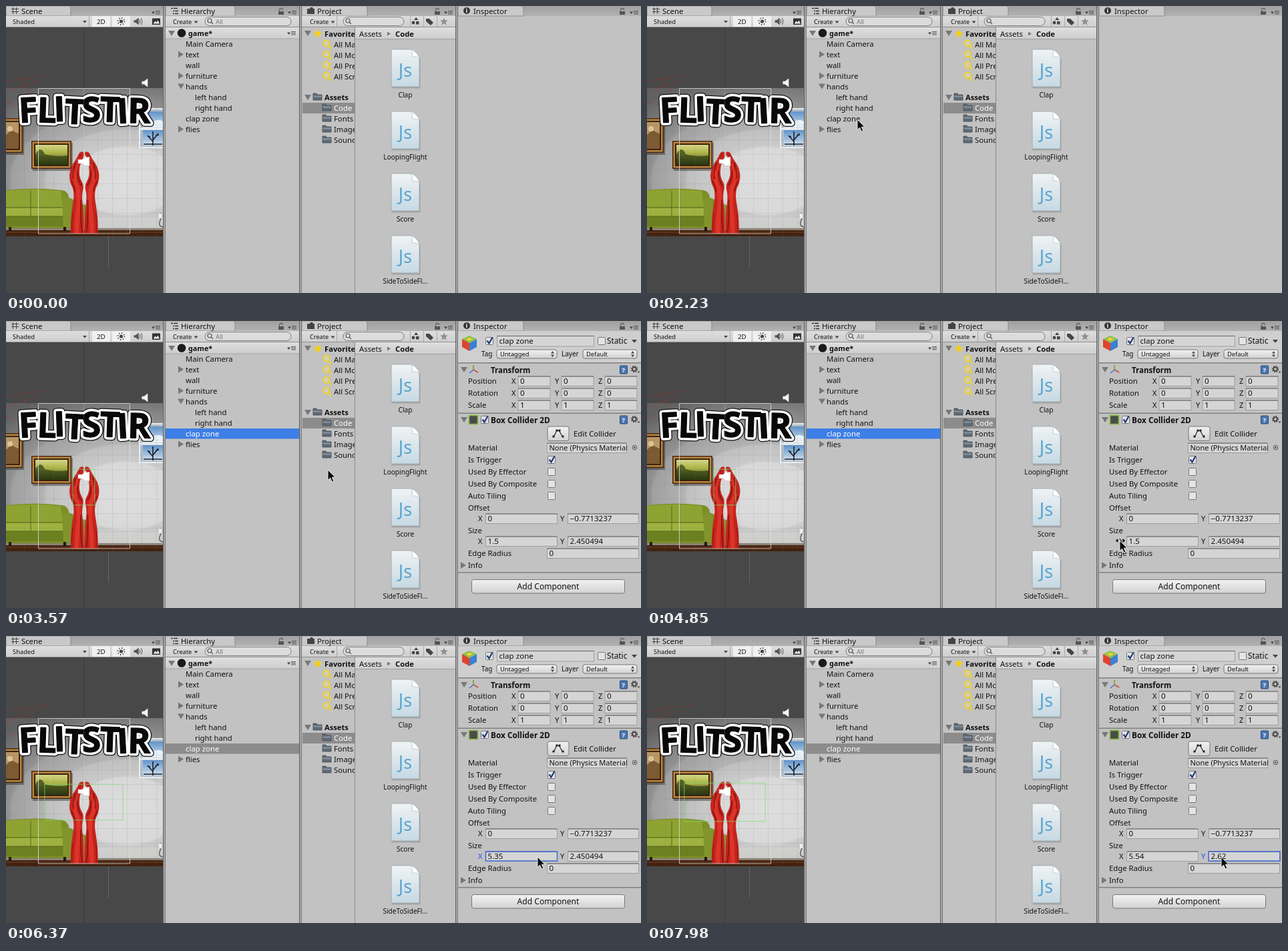
An HTML page that plays this animation: 951 by 430 pixels, repeating every 8 s.

```html
<!DOCTYPE html>
<html lang="en">
<head>
<meta charset="utf-8">
<title>Editor</title>
<style>
html, body { margin: 0; width: 100%; height: 100%; overflow: hidden; background: #c2c2c2; }
svg { display: block; }
#stage { width: 100vw; height: 100vh; }
text { font-family: "Noto Sans", sans-serif; white-space: pre; }
.logo { font: 700 52px "Open Sans", sans-serif; stroke-linejoin: round; }
</style>
</head>
<body>
<svg id="stage" viewBox="0 0 951 430" xmlns="http://www.w3.org/2000/svg"></svg>
<script>
const INK = '#111';
const text = (x, y, s, size = 11.3, more = '') => `<text x="${x}" y="${y}" font-size="${size}" fill="${INK}" ${more}>${s}</text>`;
const bold = (x, y, s, size = 11.3) => text(x, y, s, size, 'font-weight="700"');
const rect = (x, y, w, h, fill, more = '') => `<rect x="${x}" y="${y}" width="${w}" height="${h}" fill="${fill}" ${more}/>`;
const path = (d, fill = 'none', stroke = 'none', w = 1, more = '') =>
  `<path d="${d}" fill="${fill}" stroke="${stroke}" stroke-width="${w}" ${more}/>`;
const line = (d, stroke, w = 1, more) => path(d, 'none', stroke, w, more);
const disc = (x, y, r, fill, more = '') => `<circle cx="${x}" cy="${y}" r="${r}" fill="${fill}" ${more}/>`;
const clip = (x, y, w, h, body) => `<svg x="${x}" y="${y}" width="${w}" height="${h}" viewBox="${x} ${y} ${w} ${h}">${body}</svg>`;
const group = (id, body) => `<g id="${id}">${body}</g>`;
const down = (x, y, r = 3, fill = '#444') => path(`M${x - r},${y - r / 2}h${2 * r}l${-r},${r * 1.2}z`, fill);
const fold = (x, y, open) => path(open ? `M${x - 5},${y - 4}h10l-5,8z` : `M${x - 4},${y - 5}v10l8,-5z`, '#777');

// ---- panel chrome
function panel(x, w, name, tabW, bar = true) {
  const end = x + w;
  return rect(x, 0, w, 430, '#c2c2c2') + rect(x, 0, w, 15, 'url(#strip)') +
    path(`M${x},15V0H${x + tabW - 2}q2,1 2,4V15z`, '#c9c9c9', '#8a8a8a') +
    (bar ? rect(x, 15, w, 16.5, 'url(#bar)') + rect(x, 31, w, 1, '#8f8f8f') : '') +
    text(x + 23, 11.5, name) +
    path(`M${end - 17},8.5h5l-2.5,3.5z`, '#444') + line(`M${end - 11},7.5h7m-7,2.2h7m-7,2.2h7`, '#555');
}
const lock = x => rect(x - 4, 8, 8, 5, '#555') + line(`M${x - 2.5},8V6q0,-2.5 2.5,-2.5t2.5,2.5`, '#666', 1.3);
const search = (x, w, label) => rect(x, 16.5, w, 13, '#dcdcdc', 'rx="6.5" stroke="#7b7b7b"') +
  disc(x + 7, 22, 3, 'none', 'stroke="#555" stroke-width="1.2"') + line(`M${x + 9},24l3,3`, '#555', 1.3) +
  text(x + 16, 27, label, 9.5, 'style="fill:#777"');
const create = x => text(x, 27, 'Create', 9.2) + down(x + 34.5, 24);
const speaker = (x, y, k, fill) => path(`M${x - 5 * k},${y - 2 * k}h${3 * k}l${5 * k},${-4 * k}v${12 * k}l${-5 * k},${-4 * k}h${-3 * k}z`, fill);
const folder = (x, y) => path(`M${x},${y}h5l1,2h7v8h-13z`, '#5e6a74', '#434b52', .8) + rect(x + .5, y + 3.5, 12, 2, '#8996a1');

// ---- scene
function frame(x, y, w, h, body) {
  return rect(x + 2, y + 3, w, h, '#000', 'opacity=".35"') + rect(x, y, w, h, '#4a2810') +
    rect(x + 1.5, y + 1.5, w - 3, h - 3, '#b98542') + rect(x + 4, y + 4, w - 8, h - 8, '#3a220c') +
    clip(x + 6, y + 6, w - 12, h - 12, body);
}
function hand() {
  return path('M116,219q-3,-2 -6,1q-3,6 -6,11q-8,10 -9,23q0,10 5,19q3,10 0,24q-4,24 -3,44h20q0,-26 -2,-42q-2,-14 0,-22q2,-8 -1,-13q-5,-8 -4,-18q0,-8 4,-13q3,-8 2,-14z', '#c4241d') +
    path('M109,226q-9,12 -10,26q1,12 5,20q3,18 1,32q-3,20 -2,37h6q1,-32 3,-48q0,-15 -2,-22q-6,-9 -4,-22q1,-12 5,-19z', '#dd3429') +
    line('M104,235q-5,12 -3,24M107,247q0,14 6,22M112,290q-1,26 2,50M98,262q4,8 6,16', '#7a110e', 1.3) +
    line('M112,222q-4,6 -4,15M107,231q-4,8 -4,16M100,310q-2,16 -1,30', '#98150f');
}
function logo(word) {
  const xs = [20, 46, 72, 87, 114, 140, 167, 182], dy = [175, 174, 173, 176, 174, 173, 176, 175];
  const layer = (w, c) => `<text class="logo" x="${xs.join(' ')}" y="${dy.join(' ')}" rotate="-3 2 -2 3 -2 2 -3 1" fill="${c}" stroke="${c}" stroke-width="${w}">${word}</text>`;
  return layer(11, '#111') + layer(8.5, '#fff') + layer(1.2, '#080808');
}
function scene() {
  let grid = '';
  for (let x = 5; x < 235; x += 22) grid += `M${x + .5},124V345`;
  for (let y = 134; y < 345; y += 22) grid += `M0,${y + .5}H235`;
  const room = rect(0, 123, 235, 222, 'url(#wall)') +
    rect(0, 317, 235, 17, '#d2d2d0', 'opacity=".75"') + rect(0, 333, 235, 3, '#8b8276') +
    rect(0, 336, 235, 9, '#42210f') + rect(0, 338, 235, 2, '#5e321a') +
    frame(-30, 168, 55, 52, rect(-30, 168, 60, 60, '#b99664') + path('M-10,202l18,-16l12,6v40h-30z', '#7d5a32') + disc(6, 184, 4, '#dcc79a')) +
    frame(38, 202, 60, 42, rect(38, 202, 60, 42, 'url(#field)') + path('M44,222q8,-14 14,0q14,4 34,2v16h-48z', '#1c2a0d', 'none', 0, 'opacity=".6"')) +
    rect(199, 153, 40, 60, '#e9edf0') + rect(201, 155, 34, 56, '#b4bfca') +
    rect(205, 158, 30, 24, 'url(#sky)') + rect(205, 186, 30, 23, 'url(#sky)') +
    path('M206,177q8,-9 14,-3q6,-6 15,-1v9h-29z', '#e8f2fa') +
    line('M220,209v-12m0,6l-8,-9m8,7l8,-10m-8,6v-9m-4,8l-4,-1m12,-1l5,-1M206,207h28', '#18202b', 1.6) +
    line('M201,184h34', '#eef2f5', 3) +
    path('M0,276q45,-5 84,0q9,1 10,11l26,12v34h-120z', '#7c8f25') +
    path('M0,277q45,-4 82,0l3,24h-85z', '#8fa332') + path('M0,302h88v13h-88z', '#9fb23f') +
    path('M0,315h90v15h-90z', '#6c8020') + line('M0,302h88M0,315h90M37,277v38', '#56681a') +
    path('M84,290q10,-6 14,2v40h-12z', '#82952b') + rect(4, 331, 4, 6, '#20140a') + rect(86, 331, 4, 6, '#20140a') +
    line('M231,310q3,4 0,11q-4,9 4,10', '#4b4b4b', 1.2) + rect(229, 311, 4, 7, '#eee') +
    line(grid, '#777', 1, 'opacity=".14"');
  return clip(0, 32, 235, 398,
    rect(0, 32, 235, 398, '#484848') + line('M116.5,32V123M116.5,345V430', '#3a3a3a') + line('M153.5,345V392', '#666') +
    room + line('M0,113L66,103M0,129L48,112M0,143L44,162M22,107L44,140', '#d5221c', 1, 'stroke-dasharray="2 5"') +
    logo('FLITSTIR') + hand() + `<g transform="matrix(-1 0 0 1 234.5 0)">${hand()}</g>` +
    line('M48.5,123.5H185.5V341H48.5z', '#dcdcdc', 1, 'opacity=".8"') +
    line('M116.5,123V341', '#eee', 1, 'opacity=".2"') +
    '<rect id="box" fill="none" stroke="#7fdc74" stroke-width="1" opacity=".75"/>' +
    path('M108,230h6l6,-6v3l5,-1v14l-5,-1v2l-6,-5h-6z', '#fff', '#aaa', .5) +
    speaker(209, 115, 1.1, '#f4f4f4'));
}
function scenePanel() {
  return panel(0, 235, 'Scene', 97) + line('M8,4.5h11M8,8.5h11M10.5,2v10M15.5,2v10', '#444') +
    text(10, 27, 'Shaded', 9.4) + down(118, 23.5) + line('M124.5,15v16', '#aaa') +
    rect(129, 15, 27, 16, '#f0f0f0') + text(136, 27, '2D', 9.8) + rect(159, 15, 27, 16, '#f0f0f0') +
    disc(172.5, 23, 2.6, '#444') + disc(172.5, 23, 5, 'none', 'stroke="#444" stroke-width="2" stroke-dasharray="1.4 2.53"') +
    speaker(196, 23, .9, '#555') + line('M200,20q2,3 0,6m2.5,-8q3,5 0,10', '#555') +
    rect(219, 18.5, 12, 9.5, '#333') + path('M220.5,26.5l3,-4l2,2l2,-3l2.5,5z', '#eee') + scene();
}

// ---- hierarchy
function hierarchy() {
  const rows = ['Main Camera', '>text', 'wall', '>furniture', 'vhands', ' left hand', ' right hand', '', '>flies'];
  return panel(239, 200, 'Hierarchy', 104) + lock(412) +
    line('M247,3.5h3m1,0h6M250,7.5h2m1,0h5M250,11.5h2m1,0h5', '#333', 1.3) +
    create(250) + search(298, 129, 'All') +
    rect(239, 32, 200, 17, 'url(#bar)') + rect(239, 48.5, 200, 1, '#a6a6a6') +
    fold(248, 41, true) + disc(263, 40.5, 6.3, '#1a1a1a') + bold(273, 45, 'game*', 10.8) +
    path('M421,39.5h5l-2.5,3.5z', '#444') + line('M427,38.5h7m-7,2.2h7m-7,2.2h7', '#555') +
    rect(239, 161, 200, 15.5, 'none', 'id="row"') +
    rows.map((s, i) => {
      const y = 61 + 16 * i, mark = s[0], name = s.replace(/^[ >v]/, '');
      return (mark === '>' || mark === 'v' ? fold(262, y - 4.5, mark === 'v') : '') + text(mark === ' ' ? 283 : 269, y, name);
    }).join('') + text(269, 173, 'clap zone', 11.4, 'id="rowName"');
}

// ---- project
function fileIcon(name, i) {
  const y = 65 + 93 * i;
  return path(`M576.5,${y}h30l13,13v44h-43z`, '#8a8a8a', 'none', 0, 'opacity=".5" transform="translate(1 1.5)"') +
    path(`M577,${y}h30q9,4 12,13v43h-42z`, 'url(#paper)', '#9ba3a8', .8) +
    path(`M607,${y}q3,5 1,11q6,-1 11,2q-3,-9 -12,-13z`, '#fff', '#a9b4ba', .6) +
    text(598, y + 41, 'Js', 27, 'text-anchor="middle" font-weight="500" style="fill:#5aa5d0"') +
    text(598, y + 72, name, 10.1, 'text-anchor="middle"');
}
function project() {
  const star = (x, y, r, fill) => {
    const pts = Array.from({length: 10}, (_, i) => {
      const a = i * Math.PI / 5, d = i % 2 ? r * .45 : r;
      return [x + d * Math.sin(a), y - d * Math.cos(a)].map(v => v.toFixed(1));
    });
    return `<polygon points="${pts.join(' ')}" fill="${fill}"/>`;
  };
  const tree = rect(444, 145, 78, 16, '#8c8c8c') + fold(452, 41, true) + star(467, 41.5, 6.8, '#f5cf14') + bold(477, 45.5, 'Favorites', 11.2) +
    ['All Materials', 'All Models', 'All Prefabs', 'All Scripts'].map((s, i) =>
      disc(480, 56 + 16 * i, 4.6, '#d2cfb8', 'stroke="#f0d020" stroke-width="1.8"') +
      line(`M483.5,${60 + 16 * i}l4,4`, '#f0d020', 2.2) + text(491, 61.5 + 16 * i, s)).join('') +
    fold(452, 137, true) + folder(460, 131) + bold(477, 141, 'Assets', 11.2) +
    ['Code', 'Fonts', 'Images', 'Sounds'].map((s, i) =>
      folder(474, 147 + 16 * i) + text(491, 157 + 16 * i, s, 11.3, i ? '' : 'style="fill:#fff"')).join('');
  return panel(443, 230, 'Project', 98) + lock(646) + path('M451,4h4l1,-2h3l1,2h2v8h-11z', '#444') +
    create(455) + line('M495.5,15v16M605.5,15v16M625.5,15v16M645.5,15v16', '#aaa') + search(505, 91, '') +
    disc(610, 25, 2.4, '#444') + rect(614, 23, 4.5, 4.5, '#444') + path('M611,21l3.2,-4l3.2,4z', '#444') +
    path('M629,19h5l6,6l-4,4l-7,-6z', '#444') + star(656, 23.5, 6, '#8f8f8f') +
    clip(443, 32, 79, 398, tree) + rect(523, 32, 150, 17.5, 'url(#bar)') + rect(523, 49, 150, 1, '#a0a0a0') + rect(522, 32, 1, 398, '#888') +
    text(529, 45.5, 'Assets') + path('M571,38.5v6l5,-3z', '#777') + bold(583, 45.5, 'Code', 11.3) +
    ['Clap', 'LoopingFlight', 'Score', 'SideToSideFl...'].map(fileIcon).join('');
}

// ---- inspector
const field = (x, y, w, value, id = '', h = 14.5, size = 11.6) => rect(x, y, w, h, '#d5d5d5', 'stroke="#999" stroke-width=".9"') +
  line(`M${x},${y}h${w}`, '#666') + text(x + 3, y + 11, value, size, id);
const check = (x, y, on) => rect(x - 5.5, y - 5.5, 11, 11, '#e4e4e4', 'stroke="#777" rx="1"') +
  (on ? line(`M${x - 3.5},${y - .5}l3,4l5,-9`, '#1d3a78', 2.2) : '');
const popup = (x, y, w, s) => rect(x, y, w, 13, 'url(#btn)', 'rx="3" stroke="#777"') + text(x + 5, y + 10, s, 9.3) +
  path(`M${x + w - 9},${y + 5.5}h5l-2.5,-3.5zm0,2h5l-2.5,3.5z`, '#444');
const tools = y => rect(919.5, y - 6, 11, 12, '#4a78b5', 'rx="1" stroke="#29466f"') +
  text(922.5, y + 4, '?', 9.5, 'font-weight="700" style="fill:#fff"') +
  disc(941, y - 1, 2.8, 'none', 'stroke="#444" stroke-width="1.8"') +
  disc(941, y - 1, 4.4, 'none', 'stroke="#444" stroke-width="1.6" stroke-dasharray="1.7 1.756"') + down(947.5, y + 3.5, 2);
function inspector() {
  const axes = (name, i) => {
    const y = 83 + 18 * i, v = i === 2 ? '1' : '0';
    return text(692, y + 11, name) + [757, 822, 887].map((x, k) =>
      text(x, y + 11, 'XYZ'[k], 11) + field(x + 10, y, 48, v)).join('');
  };
  const pair = (y, a, b, ids) => text(707, y + 11, 'X', 11, ids ? 'id="labX"' : '') + field(718.5, y, 107, a, ids ? 'id="valX"' : '') +
    text(830, y + 11, 'Y', 11, ids ? 'id="labY"' : '') + field(841.5, y, 106, b, ids ? 'id="valY"' : '');
  const flags = ['Is Trigger', 'Used By Effector', 'Used By Composite', 'Auto Tiling'];
  return rect(677, 15, 274, 47, '#cfcfcf') +
    path('M694,22l11,5l-11,6l-11,-6z', '#8bc34a') + path('M683,27l11,6v12l-11,-6z', '#e0442c') + path('M705,27l-11,6v12l11,-6z', '#3d80cf') +
    path('M694,25l5,2l-5,3l-5,-3z', '#f4d13b') +
    check(724, 30, true) + field(735.5, 22.5, 145, 'clap zone', '', 15.5) + check(892, 30) + text(900, 34, 'Static', 11.8) + down(941, 30, 4) +
    text(712, 53, 'Tag', 10) + popup(735, 43, 90, 'Untagged') + text(832, 53, 'Layer', 10) + popup(864, 43, 81, 'Default') +
    rect(677, 62, 274, 1.5, '#818181') + fold(686, 73, true) +
    line('M700,73v-7', '#71a52e', 1.6) + line('M700,73l-6,5', '#4477cc', 1.6) + line('M700,73l7,4', '#c94b3b', 1.6) + bold(726, 78, 'Transform', 11.5) + tools(73) +
    ['Position', 'Rotation', 'Scale'].map(axes).join('') +
    rect(677, 137.5, 274, 1.5, '#818181') + fold(686, 148, true) +
    rect(693.5, 141.5, 13, 13, '#4a4a4a', 'stroke="#86b83c" stroke-width="1.6"') + check(717, 148, true) + bold(726, 153, 'Box Collider 2D', 11.8) + tools(148) +
    rect(811, 158, 32, 21.5, 'url(#btn)', 'rx="3" stroke="#777"') + line('M820.5,173.5l4,-9h4l5,9', '#222', 1.2) +
    [[820, 173], [825, 164], [829, 164], [834, 173]].map(p => rect(p[0] - 1.5, p[1] - 1.5, 3, 3, '#222')).join('') +
    text(850, 173, 'Edit Collider') + text(692, 193.5, 'Material') +
    clip(810, 182, 120, 16, field(810.5, 183, 119, 'None (Physics Material 2D)', '', 14.5, 11)) +
    disc(941.5, 189.5, 3.3, 'none', 'stroke="#555"') + disc(941.5, 189.5, 1.3, '#444') +
    flags.map((s, i) => text(692, 212 + 18 * i, s) + check(817, 208 + 18 * i, !i)).join('') +
    text(692, 284, 'Offset') + pair(289, '0', '−0.7713237') + text(692, 318, 'Size') + pair(323, '', '', true) +
    rect(0, 323, 107, 14, 'none', 'id="focus" stroke="#4169d8" stroke-width="1.5"') +
    text(692, 352, 'Edge Radius') + field(810.5, 341, 137, '0') + fold(685, 366) + text(692, 370, 'Info') +
    rect(677, 376, 274, 1.5, '#818181') + rect(697.5, 387.5, 229, 20.5, 'url(#btn)', 'rx="3" stroke="#777"') +
    text(812, 402, 'Add Component', 12.1, 'text-anchor="middle"');
}

const grad = (id, stops, radial) => {
  const tag = radial ? 'radialGradient' : 'linearGradient';
  const place = radial ? 'gradientUnits="userSpaceOnUse" cx="0" cy="0" r="1" gradientTransform="translate(180 262) scale(260 165)"' : 'x2="0" y2="1"';
  return `<${tag} id="${id}" ${place}>${stops.map(([o, c]) => `<stop offset="${o}" stop-color="${c}"/>`).join('')}</${tag}>`;
};
const stage = document.getElementById('stage');
stage.innerHTML = '<defs>' +
  grad('strip', [[0, '#a0a0a0'], [1, '#b2b2b2']]) + grad('bar', [[0, '#dedede'], [1, '#cecece']]) +
  grad('btn', [[0, '#f2f2f2'], [1, '#d2d2d2']]) + grad('paper', [[0, '#eff3f5'], [1, '#c6d9e3']]) +
  grad('sky', [[0, '#5f93c9'], [1, '#d3e2ee']]) + grad('field', [[0, '#e9e7a8'], [.45, '#a9b243'], [1, '#1d2a0b']]) +
  grad('wall', [[0, '#dedede'], [.3, '#d8d8d8'], [.32, '#cacaca'], [.46, '#c0c0c0'], [.48, '#b2b2b2'], [.66, '#a0a0a0'], [.68, '#929292'], [.85, '#787878'], [1, '#606060']], true) +
  '</defs>' + scenePanel() + hierarchy() + project() + panel(677, 274, 'Inspector', 98, false) +
  disc(690, 7, 5, '#333') + text(688.6, 10.3, 'i', 9, 'font-weight="700" style="fill:#fff"') + lock(923) +
  group('props', inspector()) +
  [235, 439, 673].map(x => rect(x, 0, 4, 430, '#a5a5a5') + rect(x, 0, 1, 430, '#626262') + rect(x + 3, 0, 1, 430, '#7a7a7a')).join('') +
  group('pointer', group('slide', path('M-7,0l5,-4v8zM9,0l-5,-4v8z', '#111', '#eee', .8)) +
    path('M0,0V15.5L3.6,12.2L6.2,18L8.8,16.9L6.3,11.2H11z', '#0a0a0a', '#f4f4f4', .9));

const $ = id => document.getElementById(id);
const set = (id, attrs) => { for (const k in attrs) $(id).setAttribute(k, attrs[k]); };
const show = (id, on) => set(id, {display: on ? 'inline' : 'none'});

// start, end, steps, pointer x, y, size x, size y
const moves = [
  [0, 0, 1, 318, 440, 1.5, 2.450494],
  [1500, 1500, 1, 318, 403],
  [1590, 1590, 1, 318, 352],
  [1770, 2230, 8, 315, 170],
  [2290, 2530, 5, 313, 166],
  [3250, 3570, 6, 482, 223],
  [3630, 3800, 4, 651, 289],
  [4160, 4850, 12, 708, 329],
  [5080, 5430, 5, 722, 328, 1.93],
  [5600, 6370, 11, 796, 331, 5.35],
  [6450, 6570, 2, 796, 331, 5.54],
  [6870, 7180, 5, 815, 317],
  [7240, 7510, 5, 836, 329],
  [7930, 7980, 2, 860, 331, 5.54, 2.62]
];
function stateAt(t) {
  let now = moves[0].slice(3);
  for (const [a, b, n, ...goal] of moves) {
    if (t < a) break;
    const p = t >= b ? 1 : (Math.floor((t - a) / (b - a) * (n - 1)) + 1) / n;
    now = now.map((v, i) => goal[i] === undefined ? v : v + (goal[i] - v) * p);
  }
  return now;
}
function draw(t) {
  const [x, y, w, h] = stateAt(t), picked = t >= 2410, typing = t >= 5080, onY = t >= 7750;
  show('pointer', t >= 1500);
  set('pointer', {transform: `translate(${x.toFixed(1)} ${y.toFixed(1)})`});
  show('slide', t >= 4850 && t < 5080 || t >= 7510 && t < 7750);
  show('props', picked);
  show('box', picked);
  show('focus', typing);
  set('row', {fill: typing ? '#8c8c8c' : picked ? '#3d7fe6' : 'none'});
  set('rowName', {fill: picked ? '#fff' : INK});
  const bw = w * 21.9, bh = h * 21.9;
  set('box', {x: 116.5 - bw / 2, y: 249 - bh / 2, width: bw, height: bh});
  $('valX').textContent = +w.toFixed(2);
  $('valY').textContent = t < 7930 ? h : h.toFixed(2);
  set('focus', {x: onY ? 841 : 718.5});
  set('labX', {fill: typing && !onY ? '#2453dd' : INK});
  set('labY', {fill: onY ? '#2453dd' : INK});
}
const begin = performance.now();
function tick() {
  draw((performance.now() - begin) % 8000);
  requestAnimationFrame(tick);
}
tick();
</script>
</body>
</html>
```
